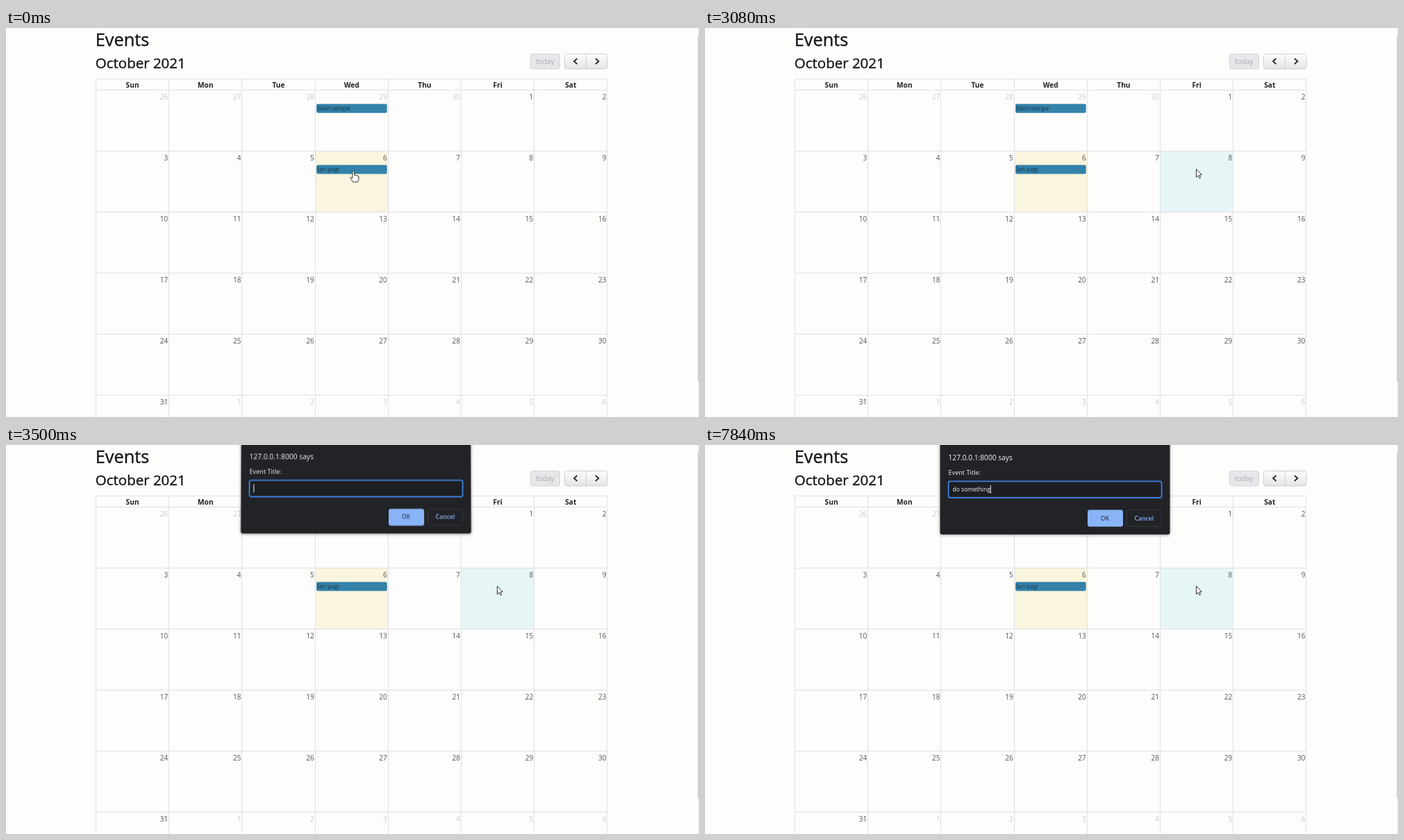
Recreate the animation shown at these times as an HTML page. Size 998 by 561 pixels, loop 8 s.

```html
<!DOCTYPE html>
<html lang="en">
<head>
<meta charset="utf-8">
<title>Events calendar</title>
<style>
  html, body { margin: 0; width: 100%; height: 100%; overflow: hidden; background: #fdfdfc; }
  svg { position: absolute; left: 0; top: 0; font-family: "Open Sans", "Noto Sans", sans-serif; }
  #dialog { left: 330px; transform-origin: 174px 50px; }
  #panel { filter: drop-shadow(0 1px 2px rgba(0, 0, 0, .4)); }
  #typed { white-space: pre; }
</style>
</head>
<body>
<svg id="page" width="998" height="561">
  <defs>
    <linearGradient id="button" x2="0" y2="1">
      <stop stop-color="#fdfdfd"/><stop offset="1" stop-color="#e4e4e4"/>
    </linearGradient>
  </defs>
  <g fill="#16181b" stroke="#16181b" stroke-width=".4">
    <text x="128.8" y="26" font-size="25.3">Events</text>
    <text x="128.8" y="57.8" font-size="20.5">October 2021</text>
  </g>
  <rect x="755.5" y="37.5" width="42" height="21.5" rx="3" fill="#e7e7ea" stroke="#d4d4d9"/>
  <text x="776.3" y="52.3" font-size="10.1" text-anchor="middle" fill="#a9a9b1">today</text>
  <rect x="804.5" y="37.5" width="61.5" height="21.5" rx="3" fill="url(#button)" stroke="#cfcfcf"/>
  <path d="M835.5 38v21" stroke="#d0d0d0"/>
  <path d="M822.5 44l-4.5 4 4.5 4M849 44l4.5 4-4.5 4" fill="none" stroke="#222" stroke-width="1.7"/>
  <g id="calendar"></g>
  <rect x="996" width="2" height="561" fill="#f4f4f4"/>
  <rect x="996.5" y="11" width="1.5" height="499" fill="#c9c9c9"/>
</svg>

<svg id="dialog" viewBox="330 0 350 140" width="350" height="140">
  <path id="panel" d="M338.5 -6H669.5V126a3 3 0 0 1-3 3H341.5a3 3 0 0 1-3-3Z" fill="#212326"/>
  <g fill="#f4f5f7">
    <text x="350.5" y="22" font-size="10.2">127.0.0.1:8000 says</text>
    <text x="350.5" y="42.8" font-size="9.15">Event Title:</text>
    <rect x="350.6" y="52.4" width="307" height="23.6" rx="2.5" fill="#1c1e21" stroke="#3f80e2" stroke-width="1.8"/>
    <text id="typed" x="356.5" y="67.2" font-size="8.45"></text>
    <rect id="caret" y="58" width="1" height="12"/>
  </g>
  <rect x="551" y="93.5" width="51" height="24.3" rx="3" fill="#8ab4f8"/>
  <rect x="607.5" y="94" width="50" height="23.3" rx="3" fill="none" stroke="#36393e"/>
  <g font-size="8.6" font-weight="600" text-anchor="middle">
    <text x="575.8" y="108.5" fill="#33435c">OK</text>
    <text x="632.3" y="108.5" fill="#8ab4f8">Cancel</text>
  </g>
</svg>

<svg width="998" height="561">
  <g id="cursor" stroke="#333" stroke-linejoin="round" fill="#fff">
    <path id="arrow" d="M.5.5V12.2L3.2 9.7 5 13.6 6.8 12.8 5 9 8.4 8.7Z"/>
    <path id="hand" d="M-1 1.2Q.5-.4 1.6 1.2V6L6 7Q8 7.4 8 9V12L6.6 16H-.2L-3.8 11Q-4.2 9-2.4 9.4L-1 10.5Z"/>
  </g>
</svg>

<script>
const $ = id => document.getElementById(id);

const left = 129.5, top0 = 89.5, colW = 105.2, rowH = 87.9;
const colX = c => left + c * colW;
const rowY = r => top0 + r * rowH;

const cell = (col, row, fill, id) =>
  `<rect id="${id}" x="${colX(col)}" y="${rowY(row)}" width="${colW}" height="${rowH}" fill="${fill}"/>`;

const eventBar = (col, row, title) => {
  const x = colX(col) + 2, y = rowY(row) + 20;
  return `<rect x="${x}" y="${y}" width="101.6" height="13" rx="2" fill="#3482aa"/>
    <text x="${x + 1.2}" y="${y + 9.8}" font-size="8.5" fill="#173442">${title}</text>`;
};

function buildCalendar() {
  let html = cell(3, 1, '#f9f5de', 'today') + cell(5, 1, '#e6f6f7', 'selected');
  let lines = `M${left} 73.5H866`;
  for (let r = 0; r < 6; r++) lines += `M${left} ${Math.floor(rowY(r)) + .5}H866`;
  for (let c = 0; c < 8; c++) lines += `M${Math.floor(colX(c)) + .5} 73V561`;
  html += `<path d="${lines}" stroke="#e0e0e6" fill="none"/>`;
  'Sun Mon Tue Wed Thu Fri Sat'.split(' ').forEach((name, c) => {
    html += `<text x="${colX(c) + colW / 2}" y="85.6" font-size="10.2" font-weight="700" text-anchor="middle" fill="#222">${name}</text>`;
  });
  for (let i = 0; i < 42; i++) {
    const date = new Date(2021, 8, 26 + i);
    const color = date.getMonth() === 9 ? '#555' : '#c9c9c9';
    html += `<text x="${colX(i % 7 + 1) - 1.4}" y="${rowY(Math.floor(i / 7)) + 13.6}" font-size="10.1" text-anchor="end" fill="${color}">${date.getDate()}</text>`;
  }
  $('calendar').innerHTML = html + eventBar(3, 0, 'bikin tempe') + eventBar(3, 1, 'lari pagi');
}

// [time, x, y] of the pointer tip
const path = [
  [0, 500, 206], [420, 500, 206], [700, 533, 270], [1140, 589, 432], [1240, 589, 432],
  [1660, 653, 202], [1800, 735, 206], [1960, 684, 200], [2080, 684, 199],
  [2260, 696, 198], [2400, 696, 198], [2540, 707, 203], [8000, 707, 203]
];

function pointerAt(t) {
  const i = path.findIndex(p => p[0] > t);
  const [t0, x0, y0] = path[i - 1], [t1, x1, y1] = path[i];
  const k = (t - t0) / (t1 - t0);
  return [x0 + (x1 - x0) * k, y0 + (y1 - y0) * k];
}

const message = 'do something';
const keyTimes = [4640, 4800, 5100, 5460, 5600, 5980, 6280, 6740, 6900, 7140, 7300, 7600];
const openTime = 3200, selectTime = 2820;

function drawDialog(t) {
  $('dialog').style.visibility = t < openTime ? 'hidden' : 'visible';
  if (t < openTime) return;
  const away = Math.exp((3240 - t) / 150);
  $('dialog').style.opacity = Math.min(1, (t - openTime) / 115);
  $('dialog').style.transform = away < .03 ? 'none' :
    `translateY(${-8.5 * away}px) perspective(1000px) rotateX(${9.6 * away}deg)`;

  const count = keyTimes.filter(k => k <= t).length;
  const typed = $('typed');
  typed.textContent = message.slice(0, count);
  $('caret').setAttribute('x', 356.5 + (count ? typed.getComputedTextLength() : 0));
  const blinkStart = count ? keyTimes[count - 1] : 3320;
  $('caret').style.opacity = Math.floor(Math.max(0, t - blinkStart) / 500) % 2 ? 0 : 1;
}

function draw() {
  const t = performance.now() % 8000;
  const [x, y] = pointerAt(t);
  const overEvent = x > 447 && x < 548 && y > 198 && y < 211;
  $('cursor').setAttribute('transform', `translate(${x} ${y})`);
  $('hand').style.display = overEvent ? '' : 'none';
  $('arrow').style.display = overEvent ? 'none' : '';
  $('selected').style.display = t < selectTime ? 'none' : '';
  drawDialog(t);
  requestAnimationFrame(draw);
}

buildCalendar();
draw();
</script>
</body>
</html>
```
